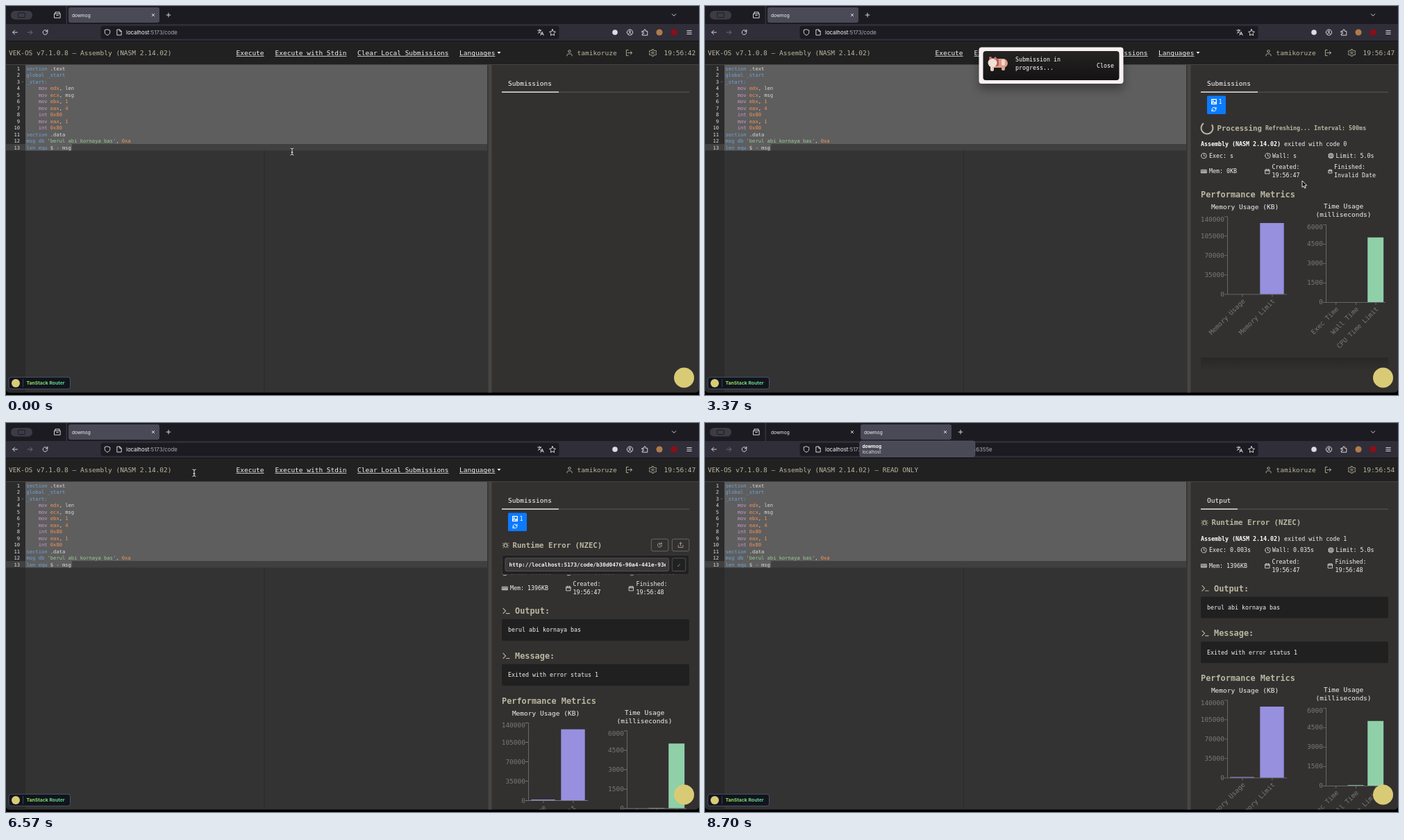
Recreate the animation shown at these times as an HTML page with a canvas. Size 998x561 px, loop 8.73 s.

```html
<!DOCTYPE html>
<html lang="en">
<head>
<meta charset="utf-8">
<title>Code runner</title>
<style>
html, body { margin: 0; width: 100%; height: 100%; overflow: hidden; background: #000; }
canvas { display: block; width: 998px; height: 561px; }
</style>
</head>
<body>
<canvas id="stage" width="998" height="561"></canvas>
<script>
const ctx = document.getElementById('stage').getContext('2d');
const LOOP = 8730;
const MONO = '"DejaVu Sans Mono", monospace';
const SANS = 'Inter, sans-serif';
const BEIGE = '#b9b7a0', LIGHT = '#e8e8e8', CHROME = '#2f2e39', FIELD = '#4a4956';
const PATH = ':5173/code/b30d0476-90a4-441e-93e7-7d56a446355e';
const GREETING = 'berul abi kornaya bas';

// Moments, in ms
const SUBMIT = 2070, GROW = 2130, RESULT = 3430, TOAST_END = 4600, SHARE = 5220, COPIED = 5500,
  NEW_TAB = 6750, PASTE = 7400, LOAD = 7670, BARE_PAGE = 7870, THEMED = 8100;

const CODE = ['section .text', 'global _start', '_start:', '    mov edx, len', '    mov ecx, msg',
  '    mov ebx, 1', '    mov eax, 4', '    int 0x80', '    mov eax, 1', '    int 0x80',
  'section .data', `msg db '${GREETING}', 0xa`, 'len equ $ - msg'];

const ICONS = {
  back: 'M20 12H4m7-7-7 7 7 7',
  forward: 'M4 12h16m-7-7 7 7-7 7',
  reload: 'M20 12a8 8 0 1 1-3-6.200l3 3M20 3v6h-6',
  close: 'M5 5l14 14M19 5 5 19',
  plus: 'M12 4v16M4 12h16',
  down: 'M4 8l8 8 8-8',
  box: 'M3 8h18v13H3zM6 3h12M9 13h6M4 8l2-5M20 8l-2-5',
  shield: 'M12 2l9 3v6c0 6-4 9-9 11c-5-2-9-5-9-11V5z',
  page: 'M5 2h9l6 6v14H5zM14 2v6h6',
  translate: 'M2 5h12M8 2v3M12 5c-1 5-5 8-9 10M5 9l7 6M12 22l5-12 5 12M14 18h6',
  star: 'M12 2l3 7 7 1-5 5 1 7-6-3-6 3 1-7-5-5 7-1z',
  account: 'M2 12a10 10 0 1 0 20 0a10 10 0 1 0-20 0M9 9a3 3 0 1 0 6 0a3 3 0 1 0-6 0M6 18c2-5 10-5 12 0',
  puzzle: 'M3 8h6V5a3 3 0 0 1 6 0v3h6v14H3v-5h3a2 2 0 0 0 0-5H3z',
  menu: 'M3 5h18M3 12h18M3 19h18',
  user: 'M8 7a4 4 0 1 0 8 0a4 4 0 1 0-8 0M4 22v-3c0-5 16-5 16 0v3',
  addUser: 'M5 7a4 4 0 1 0 8 0a4 4 0 1 0-8 0M2 21v-2c0-5 14-5 14 0v2M19 8v6M16 11h6',
  logout: 'M9 3H3v18h6M8 12h13m-5-5 5 5-5 5',
  login: 'M15 3h6v18h-6M3 12h13m-5-5 5 5-5 5',
  gear: 'M9 12a3 3 0 1 0 6 0a3 3 0 1 0-6 0M10 2h4l1 3 3 1 3-1 2 4-3 3 3 3-2 4-3-1-3 1-1 3h-4l-1-3-3-1-3 1-2-4 3-3-3-3 2-4 3 1 3-1z',
  clock: 'M2 12a10 10 0 1 0 20 0a10 10 0 1 0-20 0M12 6v6l4 2',
  cpu: 'M5 5h14v14H5zM9 9h6v6H9zM9 2v3M15 2v3M9 19v3M15 19v3M2 9h3M2 15h3M19 9h3M19 15h3',
  memory: 'M2 6h20v12H2zM6 9v4M10 9v4M14 9v4M18 9v4M2 15h20',
  calendar: 'M3 5h18v17H3zM3 10h18M8 2v5M16 2v5',
  bug: 'M7 9h10v6a5 5 0 0 1-10 0zM8 8a4 4 0 0 1 8 0M2 5l5 5M22 5l-5 5M1 14h6M17 14h6M3 22l5-5M21 22l-5-5',
  prompt: 'M2 4l8 8-8 8M12 20h10',
  again: 'M20 12a8 8 0 1 1-3-6M20 3v4h-4M12 8v4l3 2',
  share: 'M12 15V2M7 7l5-5 5 5M3 13v8h18v-8',
  picture: 'M3 3h18v18H3zM3 18l6-7 5 6 3-3 4 4M8 7h1',
  cycle: 'M3 12a9 9 0 0 1 15-6l3 3M21 3v6h-6M21 12a9 9 0 0 1-15 6l-3-3M3 21v-6h6'
};

const clamp = v => Math.max(0, Math.min(1, v));
const smooth = p => p * p * (3 - 2 * p);
const easeOut = p => 1 - (1 - clamp(p)) ** 2.6;

function rect(x, y, w, h, fill, r = 0, stroke) {
  ctx.beginPath();
  ctx.roundRect(x, y, w, h, r);
  if (fill) { ctx.fillStyle = fill; ctx.fill(); }
  if (stroke) { ctx.strokeStyle = stroke; ctx.lineWidth = 0.8; ctx.stroke(); }
}

function dot(x, y, r, fill) {
  rect(x - r, y - r, 2 * r, 2 * r, fill, r);
}

// y is the middle of the capitals
function text(s, x, y, size, color, { bold, align = 'left', font = MONO } = {}) {
  ctx.font = `${bold ? 'bold ' : ''}${size}px ${font}`;
  ctx.textAlign = align;
  ctx.fillStyle = color;
  ctx.fillText(s, x, y + size * 0.36);
  return ctx.measureText(s).width;
}

const ui = (s, x, y, size, color, bold) => text(s, x, y, size, color, { bold, font: SANS });

function icon(name, cx, cy, size, color = LIGHT, width = 0.9) {
  const k = size / 24;
  ctx.save();
  ctx.translate(cx - size / 2, cy - size / 2);
  ctx.scale(k, k);
  ctx.strokeStyle = color;
  ctx.lineWidth = width / k;
  ctx.lineJoin = ctx.lineCap = 'round';
  ctx.stroke(new Path2D(ICONS[name]));
  ctx.restore();
}

function clipped(x, y, w, h, paint) {
  ctx.save();
  ctx.beginPath();
  ctx.rect(x, y, w, h);
  ctx.clip();
  paint();
  ctx.restore();
}

function tab(x, title, active, loading, t) {
  if (active) rect(x, 2, 131, 22, FIELD, 3);
  const fresh = loading && t < BARE_PAGE;
  if (loading) dot(x + 8.5 + 3.5 * Math.sin((t - 7770) / 95), 13, 1.2, fresh ? '#ccc' : '#2e9bff');
  const left = x + (loading ? 17 : 5);
  clipped(left, 2, x + 114 - left, 22, () => ui(title, left, 13.5, 6.5, '#f4f4f8'));
  icon('close', x + 122, 13, 6);
}

function browser(t) {
  const second = t >= NEW_TAB, typing = second && t < BARE_PAGE;
  const loading = t >= LOAD && t < 8330;
  rect(0, 0, 998, 26, '#1c1b22');
  rect(0, 26, 998, 24.5, CHROME);
  rect(0, 50, 998, 0.8, '#101014');
  rect(7, 7, 31, 12.5, '#3c3b46', 6);
  rect(17.5, 10, 10, 6.500, null, 1, '#15151a');
  icon('box', 74, 13, 11);
  rect(86.8, 0, 0.8, 26, '#4a4954');
  tab(90, 'dowmog', !second, false, t);
  if (second) {
    const title = t < LOAD ? 'Yeni Sekme' : typing ? 'localhost' + PATH : 'dowmog';
    tab(224, title, true, loading, t);
  }
  icon('plus', second ? 368 : 234, 13, 8.5);
  icon('down', 962, 13, 8);

  icon('back', 13, 38, 10);
  icon('forward', 34.5, 38, 10, '#777681');
  icon(loading && !typing ? 'close' : 'reload', 56.5, 38, loading && !typing ? 8 : 10);
  if (t >= PASTE && t < LOAD) {
    const open = easeOut((t - PASTE) / 130);
    rect(133, 26, 667, 24 + 166 * open, '#42414d', 4);
    if (open > 0.2) ui('localhost' + PATH, 173, 62, 7.5, '#f0f0f4');
  }
  rect(136.500, 28.8, 660, 18.7, typing ? FIELD : '#1c1b22', 3);
  icon('shield', 146, 38, 10);
  icon('page', 163, 38, 9.5);
  icon('star', 787, 38, 10.5);
  if (!typing) icon('translate', 770, 38, 10);
  if (!typing || t >= PASTE) {
    const w = ui('localhost', 173, 38.3, 7.8, '#fbfbfe');
    const tail = second ? PATH : ':5173/code';
    const end = 173 + w + ui(tail, 173 + w, 38.3, 7.8, typing ? '#fbfbfe' : '#adacb6');
    if (typing) rect(end, 33.5, 0.7, 9.5, '#fff');
  } else rect(173, 33.5, 0.7, 9.5, '#fff');

  dot(877, 38, 3.8, '#dcdce2');
  icon('account', 898.5, 38, 10);
  icon('puzzle', 920, 38, 10);
  dot(941, 38, 4.6, '#b07a4c');
  dot(962, 38, 4.6, '#8f0d18');
  icon('menu', 984, 38, 8.5);
  if (t >= 7800) {
    rect(222.8, 26, 166, 22.5, FIELD, 3, '#5c5b68');
    ui('dowmog', 226.500, 33.2, 6.5, '#fff', true);
    ui('localhost', 226.500, 41.5, 6.3, '#dddde4');
  }
}

function header(title, clock) {
  rect(0, 50.8, 998, 34, '#222121');
  rect(0, 84, 998, 0.9, '#454343');
  text('VEK-OS v7.1.0.8 — ' + title, 4, 67.5, 9.5, BEIGE);
  text('19:56:' + clock, 947.5, 67.5, 9.5, BEIGE);
}

function account() {
  icon('user', 811.5, 67.5, 10.5, BEIGE);
  text('tamikoruze', 822.5, 67.5, 9.5, BEIGE);
  icon('logout', 897.5, 67.5, 11, BEIGE);
  icon('gear', 931.5, 67.5, 11.5, BEIGE);
}

function links() {
  const items = { 'Execute': 331.5, 'Execute with Stdin': 387.5, 'Clear Local Submissions': 506, 'Languages': 653 };
  for (const [label, x] of Object.entries(items)) {
    const w = text(label, x, 67.5, 9.5, '#f4f4f4');
    rect(x, 72, w, 0.8, '#f4f4f4');
  }
  ctx.beginPath();
  ctx.moveTo(707.5, 66); ctx.lineTo(712.5, 66); ctx.lineTo(710, 69);
  ctx.fill();
}

const TOKEN = /('[^']*'|0x\w+|\b\d\b|e[abcd]x|mov|int|section|global|_start:?|\bdb\b|equ|^msg|^len)/;

function tokenColor(s) {
  if (s[0] === "'") return '#99cc99';
  if (/^(\d|e[abcd]x)/.test(s)) return '#f99157';
  if (/^(mov|int)$/.test(s)) return '#cc99cc';
  return TOKEN.test(s) ? '#6fa3d8' : '#dadada';
}

function editor() {
  const top = 85, row = 9.5, last = top + 12 * row;
  rect(0, top, 695, 473, '#333333');
  rect(0, top, 28, 473, '#2b2b2b');
  rect(371.5, top, 0.8, 473, '#292929');
  rect(0, last, 693, row, '#404040');
  rect(28, top, 665, 12 * row, '#5e5e5e');
  rect(28, last, 67, row, '#5e5e5e');
  CODE.forEach((line, i) => {
    const y = top + 5.2 + i * row;
    text(String(i + 1), 20, y, 7.14, '#e0e0e0', { align: 'right' });
    let x = 29.5;
    for (const part of line.split(TOKEN)) x += text(part, x, y, 7.14, tokenColor(part));
  });
  icon('down', 24, 109.500, 2.5, '#999', 0.6);
}

function sidePanel(label, width) {
  rect(694.5, 85, 303.5, 473, '#333030');
  rect(694.5, 85, 5, 473, '#484444');
  rect(714, 123.8, 270, 0.8, '#666');
  rect(714, 123.4, width, 1.4, '#fff');
  text(label, 723, 111.500, 9.5, '#fff');
}

function details(dy, done) {
  const put = (s, x, y) => text(s, x, y + dy, 8.32, '#f2f2f2');
  const w = text('Assembly (NASM 2.14.02)', 714, 199.5 + dy, 8.32, '#fff', { bold: true });
  put(` exited with code ${done ? 1 : 0}`, 714 + w, 199.5);
  const mark = (name, x, y, size = 9) => icon(name, x, y + dy, size, LIGHT, 0.8);
  mark('clock', 718.5, 216); put(`Exec: ${done ? '0.003' : ''}s`, 726, 216);
  mark('clock', 810.5, 216); put(`Wall: ${done ? '0.035' : ''}s`, 817, 216);
  mark('cpu', 901.5, 216); put('Limit: 5.0s', 908.5, 216);
  mark('memory', 718.5, 238.5); put(`Mem: ${done ? 1396 : 0}KB`, 726, 238.5);
  mark('calendar', 810, 238.5, 8); put('Created:', 816.5, 232.5); put('19:56:47', 816.5, 244.5);
  const fx = done ? 907.5 : 906;
  mark('calendar', 900.5, 238.5, done ? 8 : 6);
  put('Finished:', fx, 232.5);
  put(done ? '19:56:48' : 'Invalid Date', fx, 244.5);
}

function chart(x, base, title, max, bars, fill) {
  const h = 112, w = 86, band = w / bars.length;
  title.forEach((s, i) => text(s, title.length > 1 ? 919.5 : 777.5,
    base - (title.length > 1 ? 138 : 126) + i * 12, 9.5, '#f2f2f2', { align: 'center' }));
  rect(x, base - h, 0.8, h, '#777');
  rect(x, base, w, 0.8, '#777');
  for (let i = 0; i <= 4; i++) {
    const y = base - i * h / 4;
    rect(x - 4, y, 4, 0.8, '#777');
    text(String(max * i / 4), x - 4, i === 4 ? y + 3.8 : y, 9.5, '#7b7878', { align: 'right' });
  }
  bars.forEach(([label, value], i) => {
    const left = x + band * i, height = h * value / max;
    if (height > 0.05) rect(left + band * 0.1, base - height, band * 0.8, height, fill);
    rect(left + band / 2, base, 0.8, 4, '#777');
    ctx.save();
    ctx.translate(left + band / 2, base + 6);
    ctx.rotate(-Math.PI / 4);
    text(label, 0, 3.3, 9.5, '#7b7878', { align: 'right' });
    ctx.restore();
  });
}

function metrics(dy, limit, used) {
  text('Performance Metrics', 714, 272 + dy, 11.88, BEIGE, { bold: true });
  chart(752, 415.5 + dy, ['Memory Usage (KB)'], 140000,
    [['Memory Usage', 1396 * used], ['Memory Limit', 128000 * limit]], '#9690de');
  chart(894, 427 + dy, ['Time Usage', '(milliseconds)'], 6000,
    [['Exec Time', 3 * used], ['Wall Time', 35 * used], ['CPU Time Limit', 5000 * limit]], '#8fd0a9');
  const shade = ctx.createLinearGradient(0, 507 + dy, 0, 527 + dy);
  shade.addColorStop(0, 'rgba(0,0,0,.2)');
  shade.addColorStop(1, 'rgba(0,0,0,0)');
  rect(714, 507 + dy, 270, 20, shade);
}

function outcome(dy, limit, used) {
  icon('bug', 719.5, 176 + dy, 10, BEIGE);
  text('Runtime Error (NZEC)', 729.5, 176 + dy, 10.69, BEIGE, { bold: true });
  details(dy, true);
  [['Output:', GREETING], ['Message:', 'Exited with error status 1']].forEach(([head, body], i) => {
    const y = 271 + dy + i * 64.8;
    icon('prompt', 720.5, y, 11, BEIGE, 1.1);
    text(head, 733, y, 11.88, BEIGE, { bold: true });
    rect(714, y + 12, 270, 31, '#212020', 2);
    text(body, 723, y + 27.5, 8.32, '#f2f2f2');
  });
  metrics(dy + 128.6, limit, used);
}

function processing(t) {
  ctx.beginPath();
  const a = (t - 2130) / 70;
  ctx.arc(723, 176, 8.5, a + 0.5, a + 5.2);
  ctx.strokeStyle = BEIGE;
  ctx.lineWidth = 2;
  ctx.stroke();
  text('Processing', 737.5, 176.5, 10.69, BEIGE, { bold: true });
  text('Refreshing... Interval: 500ms', 807, 176.5, 8.32, BEIGE, { bold: true });
  details(0, false);
  metrics(0, easeOut((t - GROW) / 600), 0);
}

function actions(t) {
  rect(929.3, 167.3, 24.5, 17.5, t > 4300 && t < 5130 ? '#4d4a4a' : null, 2.5, '#777474');
  rect(959.3, 167.3, 24.5, 17.5, t > 5140 && t < 5330 ? '#4d4a4a' : null, 2.5, '#777474');
  icon('again', 941.5, 176, 9, BEIGE, 0.8);
  icon('share', 971.5, 176, 9, BEIGE, 0.8);
  if (t < SHARE) return;
  rect(714.4, 190.4, 269.2, 28, '#222121', 2, '#3d3b3b');
  rect(719, 195, 235.5, 18.5, '#393737', 2, '#605d5d');
  clipped(724, 195, 226, 18, () =>
    text('http://localhost' + PATH, 724.5, 204.5, 7.72, '#f4f4f4', { bold: true }));
  rect(959.3, 195, 19.5, 18.5, '#222121', 2, '#605d5d');
  if (t >= COPIED) text('✓', 969, 204.5, 8.5, '#35c15e', { align: 'center' });
  else { rect(966, 201, 5, 6, null, 1, BEIGE); rect(968, 203, 5, 6, '#222121', 1, BEIGE); }
}

function submissions(t) {
  sidePanel('Submissions', 82);
  if (t < SUBMIT + 20) return;
  rect(723, 129.5, 27, 26.5, '#0a7bff', 1.5);
  icon('picture', 733, 138, 9, '#fff', 1.2);
  text('1', 739.5, 138.5, 8.32, '#fff');
  icon('cycle', 733, 149, 8, '#fff', 0.9);
  if (t < RESULT) return processing(t);
  outcome(0, 1, easeOut((t - RESULT) / 600));
  actions(t);
}

function toast(t) {
  const shown = easeOut((t - SUBMIT + 20) / 150) * (1 - smooth(clamp((t - TOAST_END) / 250)));
  if (shown <= 0) return;
  ctx.save();
  ctx.globalAlpha = shown;
  ctx.translate(0, -55 * (1 - shown));
  ctx.shadowColor = 'rgba(0,0,0,.35)';
  ctx.shadowBlur = 14;
  ctx.shadowOffsetY = 8;
  rect(394.5, 59.5, 208, 52.5, '#f7f1f3', 4);
  ctx.shadowColor = 'transparent';
  const fill = ctx.createLinearGradient(0, 65, 0, 107);
  fill.addColorStop(0, '#262323');
  fill.addColorStop(1, '#141212');
  rect(400.500, 65, 196, 42, fill, 4);
  rect(411, 85, 5, 9, '#e9cfc0', 2);
  rect(427, 84, 5, 9, '#d9a89a', 2);
  rect(410, 76, 26, 13, '#dc9c8c', 7);
  rect(417, 76, 6, 11, '#b55a52', 3);
  rect(427, 77, 5, 9, '#f0d8ca', 3);
  dot(414, 82, 6.5, '#f1e0d4');
  dot(411, 75, 2, '#c9786a');
  dot(418, 75.5, 2, '#c9786a');
  text('Submission in', 447, 77, 8.32, '#fff');
  text('progress...', 447, 89, 8.32, '#fff');
  text('Close', 564, 86, 8.32, '#fff');
  ctx.restore();
}

function devtools() {
  rect(4, 535.3, 88.5, 17, '#12141c', 3.5, '#50617c');
  dot(14, 544, 6, '#d9cb76');
  rect(24.3, 538, 0.7, 11.5, '#475569');
  const green = ctx.createLinearGradient(29, 0, 88, 0);
  green.addColorStop(0, '#a3e65a');
  green.addColorStop(1, '#4fd3a0');
  ui('TanStack Router', 29.5, 544, 6.85, green, true);
  dot(976.5, 536, 14.5, '#d9cb76');
}

function status(label) {
  rect(-1, 546.3, 143.5, 12, '#38373d', 1, '#5b5a63');
  ui(label, 1.500, 552.3, 6.4, '#f4f4f4');
}

function barePage() {
  rect(0, 85, 695, 473, '#fff');
  rect(0, 85, 23.5, 473, '#f0f0f0');
  rect(0, 85, 695, 9.5, '#ededed');
  rect(367.5, 85, 0.8, 473, '#ececec');
  text('1', 16, 90.3, 7.14, '#333', { align: 'right' });
  text(`print("${GREETING}")`, 25, 90.3, 7.14, '#111');
  rect(694.5, 85, 303.5, 473, '#333030');
  rect(714, 123.8, 270, 0.8, '#666');
  rect(714, 99.5, 53, 25, '#e9e9ed', 2);
  text('Output', 723, 111.5, 9.5, '#111');
  header('Python (3.8.1) — READ ONLY', 53);
  [['login', 876, 8.5, 8.5], ['addUser', 897.5, 8.5, 8.5], ['gear', 931.5, 16, 13]].forEach(([name, x, rx, ry]) => {
    rect(x - rx, 67.5 - ry, 2 * rx, 2 * ry, '#e9e9ed', 3);
    icon(name, x, 67.5, 11, '#222', 1);
  });
  rect(4, 537, 80.5, 10, '#12141c');
  dot(10, 544, 6, '#d9cb76');
  ui('TanStack Router', 26, 545, 6.85, '#6fdc72', true);
  status('cdn.jsdelivr.net okunuyor');
}

function page(t) {
  if (t < NEW_TAB) {
    editor();
    submissions(t);
    // One clock second passes every 430 ms until the result is requested
    const clock = 42 + Math.min(5, Math.floor((t + 90) / 430));
    header('Assembly (NASM 2.14.02)', clock);
    links();
    account();
    devtools();
    toast(t);
  } else if (t < BARE_PAGE) {
    rect(0, 50, 998, 508, CHROME);
    if (t >= LOAD) status('localhost');
  } else if (t < THEMED) {
    barePage();
  } else {
    editor();
    sidePanel('Output', 53);
    const grown = easeOut((t - THEMED) / 600);
    outcome(-32.6, grown, grown);
    header('Assembly (NASM 2.14.02) — READ ONLY', t < 8430 ? 53 : 54);
    account();
    devtools();
  }
}

const POINTER = [[30, 412, 210], [800, 351, 68], [1640, 351, 68], [2130, 636, 248], [2480, 860, 252],
  [3450, 860, 252], [4030, 905, 215], [4170, 905, 215], [4380, 941, 178], [5070, 941, 178],
  [5190, 971, 177], [5290, 971, 177], [5460, 969, 205], [5830, 969, 205], [6270, 420, 330],
  [6470, 420, 330], [6570, 271, 72], [6680, 235, 14]];

function pointerAt(t) {
  const next = POINTER.findIndex(k => k[0] > t);
  if (next === 0) return POINTER[0].slice(1);
  if (next < 0) return POINTER.at(-1).slice(1);
  const [t0, x0, y0] = POINTER[next - 1], [t1, x1, y1] = POINTER[next];
  const p = smooth((t - t0) / (t1 - t0));
  return [x0 + (x1 - x0) * p, y0 + (y1 - y0) * p];
}

function pointer(t) {
  if (t >= NEW_TAB + 60) return;
  const [x, y] = pointerAt(t);
  const overLink = y < 75 && y > 60 && x > 331 && x < 372;
  const overButton = x > 928 && x < 984 && y > 166 && y < 214;
  ctx.save();
  ctx.translate(x, y);
  ctx.lineJoin = 'round';
  if (overLink || overButton) {
    const hand = new Path2D('M-1.500 1V-4a1 1 0 0 1 2 0v3l3 .8q1.500 .4 1 2l-1 3.500h-4l-3-4q0-1.500 2-.3z');
    ctx.fillStyle = '#111';
    ctx.strokeStyle = '#fff';
    ctx.fill(hand);
    ctx.lineWidth = 0.9;
    ctx.stroke(hand);
  } else if (x < 694 && y > 52) {
    const beam = new Path2D('M-2.500-5Q0-5 0-3.500Q0-5 2.500-5M0-3.500V3.500M-2.500 5Q0 5 0 3.500Q0 5 2.500 5M-1.500 1h3');
    ctx.strokeStyle = '#111';
    ctx.lineWidth = 2.4;
    ctx.stroke(beam);
    ctx.strokeStyle = '#fff';
    ctx.lineWidth = 1;
    ctx.stroke(beam);
  } else {
    const arrow = new Path2D('M0 0v9.500l2.200-2 1.500 3.300 1.500-.7-1.500-3.200h3z');
    ctx.fillStyle = '#000';
    ctx.strokeStyle = '#fff';
    ctx.lineWidth = 0.9;
    ctx.fill(arrow);
    ctx.stroke(arrow);
  }
  ctx.restore();
}

function draw(t) {
  rect(0, 0, 998, 561, '#000');
  ctx.save();
  ctx.beginPath();
  ctx.roundRect(0, 0, 998, 557.5, [0, 0, 5, 5]);
  ctx.clip();
  page(t);
  browser(t);
  pointer(t);
  ctx.restore();
}

const start = performance.now();
function frame() {
  draw((performance.now() - start) % LOOP);
  requestAnimationFrame(frame);
}
frame();
</script>
</body>
</html>
```
